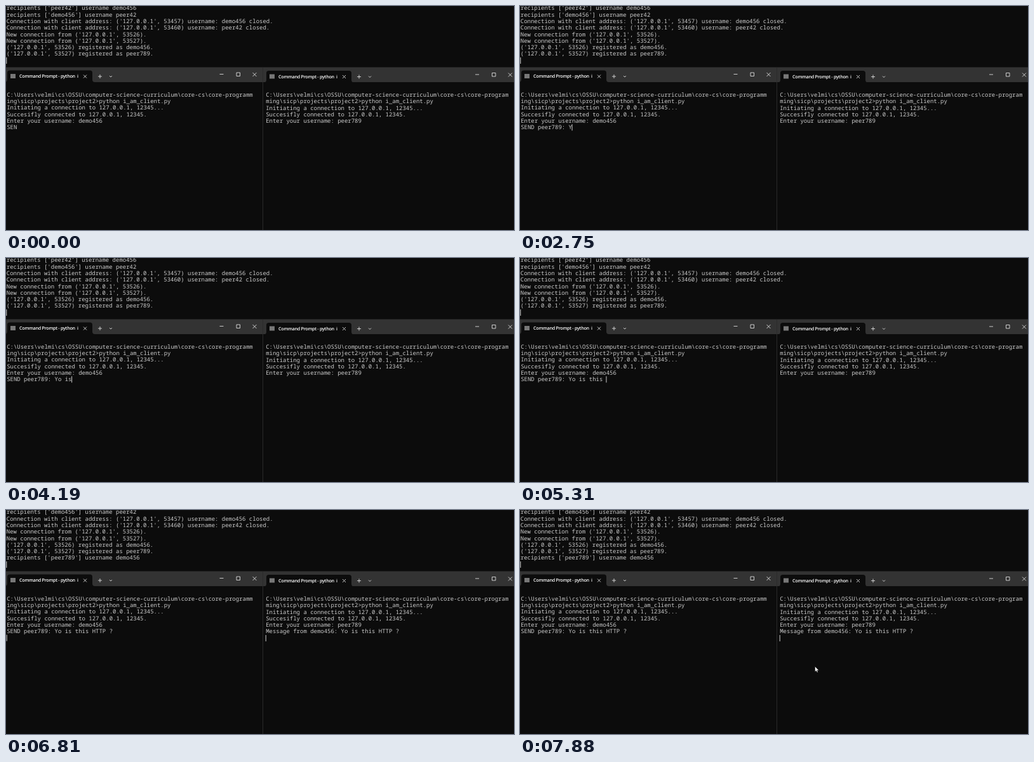
An HTML page that plays this animation: 800x353 px, repeating every 8000 ms.

```html
<!DOCTYPE html>
<html lang="en">
<head>
<meta charset="utf-8">
<title>Chat over sockets</title>
<style>
  html, body { margin: 0; width: 100%; height: 100%; overflow: hidden; background: #0c0c0c; }
  svg { display: block; width: 800px; height: 353px; }
  text { white-space: pre; text-rendering: geometricPrecision; }
  .term { font: 8.983px "Noto Sans Mono", "DejaVu Sans Mono", monospace; fill: #ccc; }
  .title { font: 600 7.2px "Open Sans", "Noto Sans", sans-serif; fill: #fff; }
  .caret { fill: #ccc; }
  .icon { fill: none; stroke: #ddd; stroke-width: .9; }
</style>
</head>
<body>
<svg viewBox="0 0 800 353">
  <defs>
    <g id="tab">
      <path d="M-2 120Q2 120 2 116V105Q2 101.500 6 101.500H132Q136 101.500 136 105V116Q136 120 140 120Z" fill="#0c0c0c"/>
      <rect x="7" y="107" width="8" height="7" fill="#777"/>
      <text class="title" x="21" y="113.400" textLength="93" lengthAdjust="spacing">Command Prompt - python  i</text>
      <path class="icon" d="M122 108.500l5 5m0 -5l-5 5M145 111h6m-3 -3v6M163 110l2 2l2 -2"/>
    </g>
    <path id="controls" class="icon" d="M336.500 107.500h6M363 105h5.500v5.500h-5.500zM388.500 105l6 6m0 -6l-6 6"/>
  </defs>
  <g id="server"></g>
  <rect y="96.500" width="800" height="23.500" fill="#333"/>
  <use href="#tab"/>
  <use href="#controls"/>
  <use href="#tab" x="408" y=".5"/>
  <use href="#controls" x="402.500" y=".5"/>
  <rect x="404" y="97" width="1" height="256" fill="#2b2b2b"/>
  <g id="sender"></g>
  <g id="receiver"></g>
  <path id="pointer" d="M0 0V8.500L2 6.700L3.400 9.600L4.800 9L3.500 6.200H6.200Z" fill="#fff" stroke="#000" stroke-width=".5"/>
</svg>
<script>
const LOOP = 8000, CHAR = 5.39;
const ANN = "demo456", BOB = "peer789", OLD = "peer42";

// [first key, last key, characters]; "<" is backspace
const typing = [
  [60, 60, "D"], [750, 750, " "], [1500, 1500, "p"], [1690, 1690, "ee"], [1810, 1810, "r"],
  [2000, 2190, "789"], [2440, 2440, ":"], [2750, 2750, " Y"], [3000, 3440, "o isth"],
  [3750, 3750, "<"], [4190, 4190, "<"], [4250, 4250, " "], [4440, 4560, "th"],
  [4690, 4690, "is"], [4810, 4940, " h"], [5310, 5310, "<"], [5750, 6060, "HTTP"],
  [6250, 6250, " "], [6440, 6440, "?"]
];
const ENTER = 6750, DELIVERED = 6810;

// [time, x, y]
const pointerPath = [[7380, 330, 138], [7500, 372, 205], [7620, 415, 273], [7740, 446, 262], [7880, 464.5, 246.500]];

const serverLog = [
  `recipients ['${OLD}'] username ${ANN}`,
  `recipients ['${ANN}'] username ${OLD}`,
  `Connection with client address: ('127.0.0.1', 53457) username: ${ANN} closed.`,
  `Connection with client address: ('127.0.0.1', 53460) username: ${OLD} closed.`,
  "New connection from ('127.0.0.1', 53526).",
  "New connection from ('127.0.0.1', 53527).",
  `('127.0.0.1', 53526) registered as ${ANN}.`,
  `('127.0.0.1', 53527) registered as ${BOB}.`,
  `recipients ['${BOB}'] username ${ANN}`
];

function clientLog(name, columns) {
  const command = "C:\\Users\\velmi\\cs\\OSSU\\computer-science-curriculum\\core-cs\\core-programming\\sicp\\projects\\project2>python i_am_client.py";
  return [command.slice(0, columns), command.slice(columns),
    "Initiating a connection to 127.0.0.1, 12345...",
    "Succesifly connected to 127.0.0.1, 12345.",
    "Enter your username: " + name];
}
const senderLog = clientLog(ANN, 72), receiverLog = clientLog(BOB, 71);

function add(parent, tag, attributes) {
  const node = document.createElementNS("http://www.w3.org/2000/svg", tag);
  for (const key in attributes) node.setAttribute(key, attributes[key]);
  return parent.appendChild(node);
}

// Returns a function that shows lines, with the caret after the last one.
function terminal(id, x, baseline, pitch, rows) {
  const group = document.getElementById(id);
  const texts = Array.from({ length: rows }, (_, i) =>
    add(group, "text", { class: "term", x, y: baseline + i * pitch }));
  const caret = add(group, "rect", { class: "caret", width: 1, height: 10 });
  return (lines, caretOpacity = 1) => {
    texts.forEach((text, i) => {
      const line = lines[i] || "";
      if (text.textContent !== line) text.textContent = line;
    });
    const last = lines.length - 1;
    caret.setAttribute("x", x - .5 + lines[last].length * CHAR);
    caret.setAttribute("y", baseline + last * pitch - 7.7);
    caret.setAttribute("opacity", caretOpacity);
  };
}
const showServer = terminal("server", .8, 6.3, 10.3, 9);
const showSender = terminal("sender", 1.2, 142.800, 10.25, 7);
const showReceiver = terminal("receiver", 409.200, 143.200, 10.25, 7);

function typedText(t) {
  let text = "SEN";
  for (const [start, end, keys] of typing) {
    const gap = (end - start) / Math.max(1, keys.length - 1);
    [...keys].forEach((key, i) => {
      if (t >= start + i * gap) text = key === "<" ? text.slice(0, -1) : text + key;
    });
  }
  return text;
}

function caretOpacity(t) {
  if (t < 60 || t >= 7380) return 0;
  if (t < 690 || t >= 1310) return 1;
  return t < 750 ? .5 : 0;
}

function placePointer(t) {
  const pointer = document.getElementById("pointer");
  const visible = t >= pointerPath[0][0];
  pointer.setAttribute("visibility", visible ? "visible" : "hidden");
  if (!visible) return;
  const next = pointerPath.findIndex(p => p[0] > t);
  const b = pointerPath[next < 0 ? pointerPath.length - 1 : next];
  const a = next < 0 ? b : pointerPath[next - 1];
  const k = next < 0 ? 0 : (t - a[0]) / (b[0] - a[0]);
  pointer.setAttribute("transform", `translate(${a[1] + (b[1] - a[1]) * k} ${a[2] + (b[2] - a[2]) * k})`);
}

function draw() {
  const t = performance.now() % LOOP;
  const message = typedText(t), delivered = t >= DELIVERED;
  showServer([...(delivered ? serverLog.slice(1) : serverLog.slice(0, 8)), ""]);
  showSender([...senderLog, message, ...(t >= ENTER ? [""] : [])], caretOpacity(t));
  const received = delivered ? [`Message from ${ANN}: Yo is this HTTP ?`, ""] : [""];
  showReceiver([...receiverLog, ...received], delivered ? 1 : 0);
  placePointer(t);
  requestAnimationFrame(draw);
}
draw();
</script>
</body>
</html>
```
